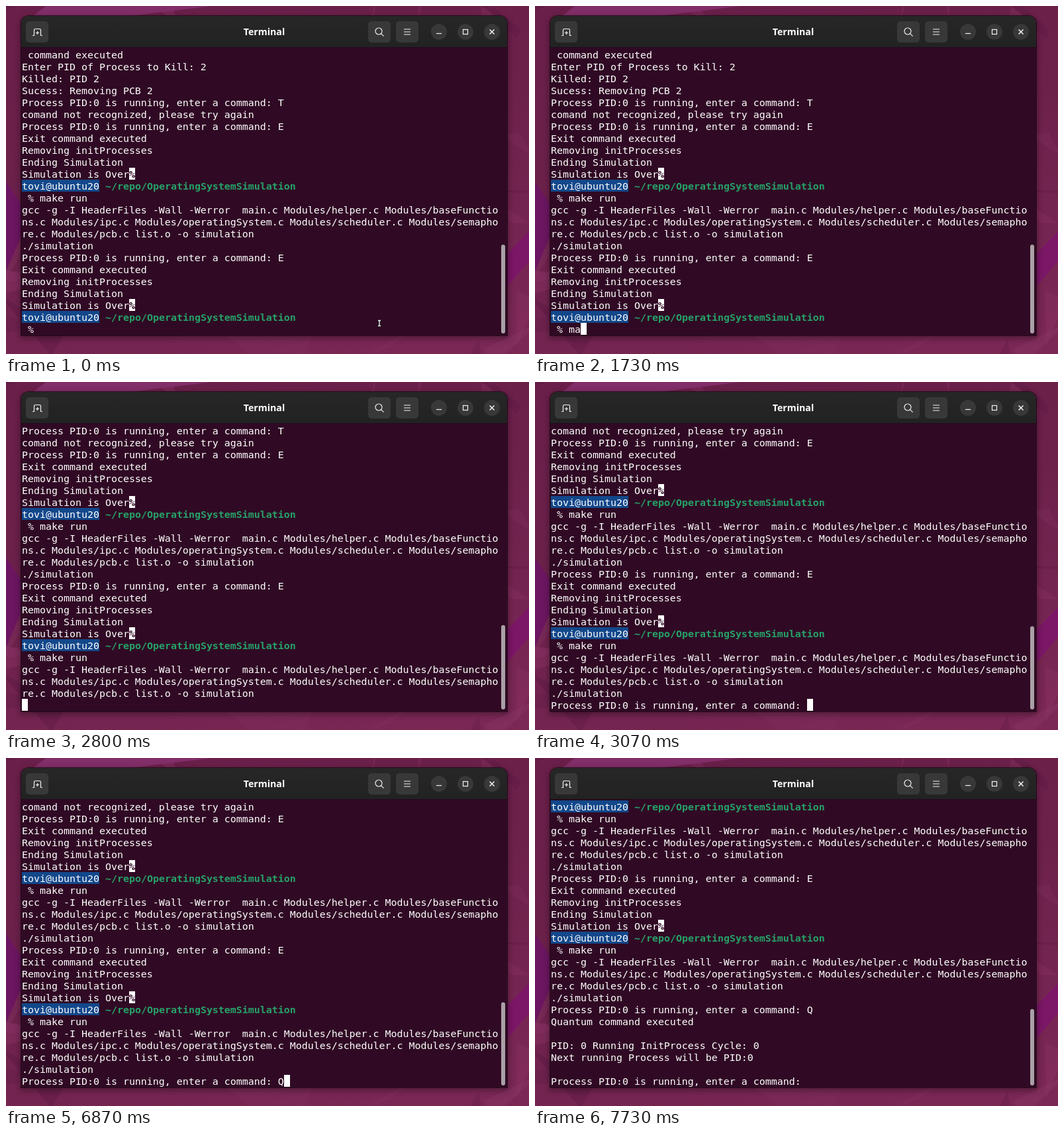
Recreate the animation shown at these times as an HTML page. Size 790x525 px, loop 8000 ms.

```html
<!DOCTYPE html>
<html lang="en">
<head>
<meta charset="utf-8">
<title>Terminal</title>
<style>
html, body { margin: 0; width: 100%; height: 100%; overflow: hidden; background: #702450; }
svg { position: absolute; left: 0; top: 0; width: 790px; height: 525px; }
#wall { background: linear-gradient(165deg, #6a1f4a, #6c214b 45%, #7c2856); }
#win {
  position: absolute; left: 23px; top: 15px; width: 734px; height: 482px;
  background: linear-gradient(#272727, #222 47px, #1a0814 47px, #300a24 48px);
  border-radius: 11px 11px 0 0;
  box-shadow: 0 0 0 1px rgba(20, 4, 15, .75), 0 3px 10px 2px rgba(0, 0, 0, .32);
}
#rows text {
  font: 14.95px "DejaVu Sans Mono", "Liberation Mono", monospace;
  fill: #fff; white-space: pre;
}
#rows .path { font-weight: bold; fill: #26a269; }
#rows .mark { font-weight: bold; fill: #300a24; }
#title { font: bold 14.2px "Noto Sans", "Open Sans", sans-serif; fill: #fff; }
</style>
</head>
<body>
<svg id="wall" viewBox="0 0 790 525">
  <g id="facets"></g>
  <path d="M60 0H310L180 16H40Z" fill="#822e69"/>
  <path d="M0 265L24 300V345L0 400Z" fill="#6c1661"/>
  <path d="M756 375L790 340V385L756 425Z" fill="#7c1767"/>
</svg>
<div id="win"></div>
<svg viewBox="0 0 790 525">
  <g fill="#383838">
    <rect x="30" y="23" width="34" height="32" rx="5"/>
    <rect x="547" y="23" width="34" height="32" rx="5"/>
    <rect x="589" y="23" width="34" height="32" rx="5"/>
    <circle cx="654" cy="39" r="12"/>
    <circle cx="694" cy="39" r="12"/>
    <circle cx="734" cy="39" r="12"/>
  </g>
  <text id="title" x="390" y="44" text-anchor="middle">Terminal</text>
  <g fill="none" stroke="#f2f2f2" stroke-width="1.2">
    <path d="M40 44.500h2.500v-8q0-2 2-2h6q2 0 2 2v8h2.500M47.500 38v5M45 40.500h5"/>
    <circle cx="563" cy="38" r="5"/>
    <path d="M566.600 41.600l4 4"/>
    <path d="M601 35h10M601 39h10M601 43h10"/>
    <path d="M650 41.500h8"/>
    <rect x="690.5" y="35.500" width="7" height="7"/>
    <path d="M730.500 35.500l7 7M737.500 35.500l-7 7" stroke-width="1.5"/>
  </g>
  <rect id="bar" x="748" width="6" rx="3" fill="#a9a0a6"/>
  <g id="rows"></g>
  <g id="pointer" fill="none">
    <path d="M-2.500-4h5M0-4v8M-2.500 4h5" stroke="#111" stroke-width="2.600"/>
    <path d="M-2-4h4M0-4v8M-2 4h4" stroke="#fff" stroke-width="1.300"/>
  </g>
</svg>
<script>
const LOOP = 8000, ROWS = 24, LEFT = 24, TOP = 64, CELL = 9, LINE = 18;
const $ = id => document.getElementById(id);

function add(parent, tag, attrs, text) {
  const el = document.createElementNS("http://www.w3.org/2000/svg", tag);
  for (const key in attrs) el.setAttribute(key, attrs[key]);
  if (text) el.textContent = text;
  parent.append(el);
}

// Soft wallpaper facets along the four edges
let seed = 7;
const random = () => (seed = seed * 16807 % 2147483647) / 2147483647;
for (let i = 0; i < 28; i++) {
  const along = random(), side = i % 4;
  const x = side < 2 ? along * 790 : side === 2 ? 0 : 790;
  const y = side > 1 ? along * 525 : side === 0 ? 0 : 525;
  const corner = () => `${x + (random() - .5) * 190},${y + (random() - .5) * 130}`;
  add($("facets"), "polygon", {
    points: [corner(), corner(), corner()].join(" "),
    fill: i % 3 ? "#8c3768" : "#55153f", opacity: .15 + random() * .25
  });
}

const USER = "tovi@ubuntu20", PATH = " ~/repo/OperatingSystemSimulation";
const ASK = "Process PID:0 is running, enter a command: ";
const exit = [ASK + "E", "Exit command executed", "Removing initProcesses",
  "Ending Simulation", "Simulation is Over%"];
const build = [USER + PATH, " % make run",
  "gcc -g -I HeaderFiles -Wall -Werror  main.c Modules/helper.c Modules/baseFunctio",
  "ns.c Modules/ipc.c Modules/operatingSystem.c Modules/scheduler.c Modules/semapho",
  "re.c Modules/pcb.c list.o -o simulation", "./simulation"];
const log = [" command executed", "Enter PID of Process to Kill: 2", "Killed: PID 2",
  "Sucess: Removing PCB 2", ASK + "T", "comand not recognized, please try again",
  ...exit, ...build, ...exit, ...build, ASK + "Q", "Quantum command executed", "",
  "PID: 0 Running InitProcess Cycle: 0", "Next running Process will be PID:0", ""];

const TYPE_AT = 1600, KEY_MS = 125;
const scenes = [
  { from: 0, first: 0, bottom: " % ", typed: "make run" },
  { from: 2800, first: 4, bottom: "" },
  { from: 3070, first: 5, bottom: ASK },
  { from: 6870, first: 5, bottom: ASK + "Q" },
  { from: 7200, first: 11, bottom: ASK }
];
const cursorFlips = [670, 1270, TYPE_AT, 3400, 4000, 5330, 5470, 6070, 6670, 7730];

function stateAt(t) {
  const { first, bottom, typed = "" } = scenes.findLast(s => s.from <= t);
  const keys = Math.max(0, Math.floor((t - TYPE_AT) / KEY_MS) + 1);
  const cursor = cursorFlips.filter(flip => flip <= t).length % 2;
  return { first, bottom: bottom + typed.slice(0, keys), cursor };
}

function block(col, row, count, fill) {
  add($("rows"), "rect", { x: LEFT + col * CELL, y: TOP + row * LINE,
    width: count * CELL, height: LINE, fill });
}

function write(text, col, row, cls = "") {
  add($("rows"), "text", { x: LEFT + col * CELL, y: TOP + row * LINE + 15, class: cls }, text);
}

function drawLine(text, row) {
  if (text.startsWith(USER)) {
    block(0, row, USER.length, "#12488b");
    write(USER, 0, row);
    write(PATH, USER.length, row, "path");
  } else if (text.endsWith("Over%")) {
    const end = text.length - 1;
    write(text.slice(0, end), 0, row);
    block(end, row, 1, "#fff");
    write("%", end, row, "mark");
  } else if (text) {
    write(text, 0, row);
  }
}

function draw({ first, bottom, cursor }) {
  $("rows").replaceChildren();
  for (let i = 0; i < ROWS - 1; i++) drawLine(log[first + i], i);
  drawLine(bottom, ROWS - 1);
  if (cursor) block(bottom.length, ROWS - 1, 1, "#fff");
  const y = 360 + 1.7 * first;
  $("bar").setAttribute("y", y);
  $("bar").setAttribute("height", 494 - y);
}

// The pointer sweeps left on an arc in six hops, nudges right, then hides for typing
function movePointer(t) {
  const clamp = v => Math.min(1, Math.max(0, v));
  const p = clamp(Math.floor((t - 4) / 66) / 6), q = 1 - p;
  const x = q * 564 + p * 155.5 + 7 * clamp((t - 900) / 100);
  const y = q * q * 478.5 + 2 * q * p * 432 + p * p * 473.5;
  $("pointer").setAttribute("transform", `translate(${x} ${y})`);
  $("pointer").setAttribute("visibility", t < TYPE_AT ? "visible" : "hidden");
}

const start = performance.now();
let shown;
function frame() {
  const t = (performance.now() - start) % LOOP;
  const state = stateAt(t), key = JSON.stringify(state);
  if (key !== shown) {
    draw(state);
    shown = key;
  }
  movePointer(t);
  requestAnimationFrame(frame);
}
frame();
</script>
</body>
</html>
```
